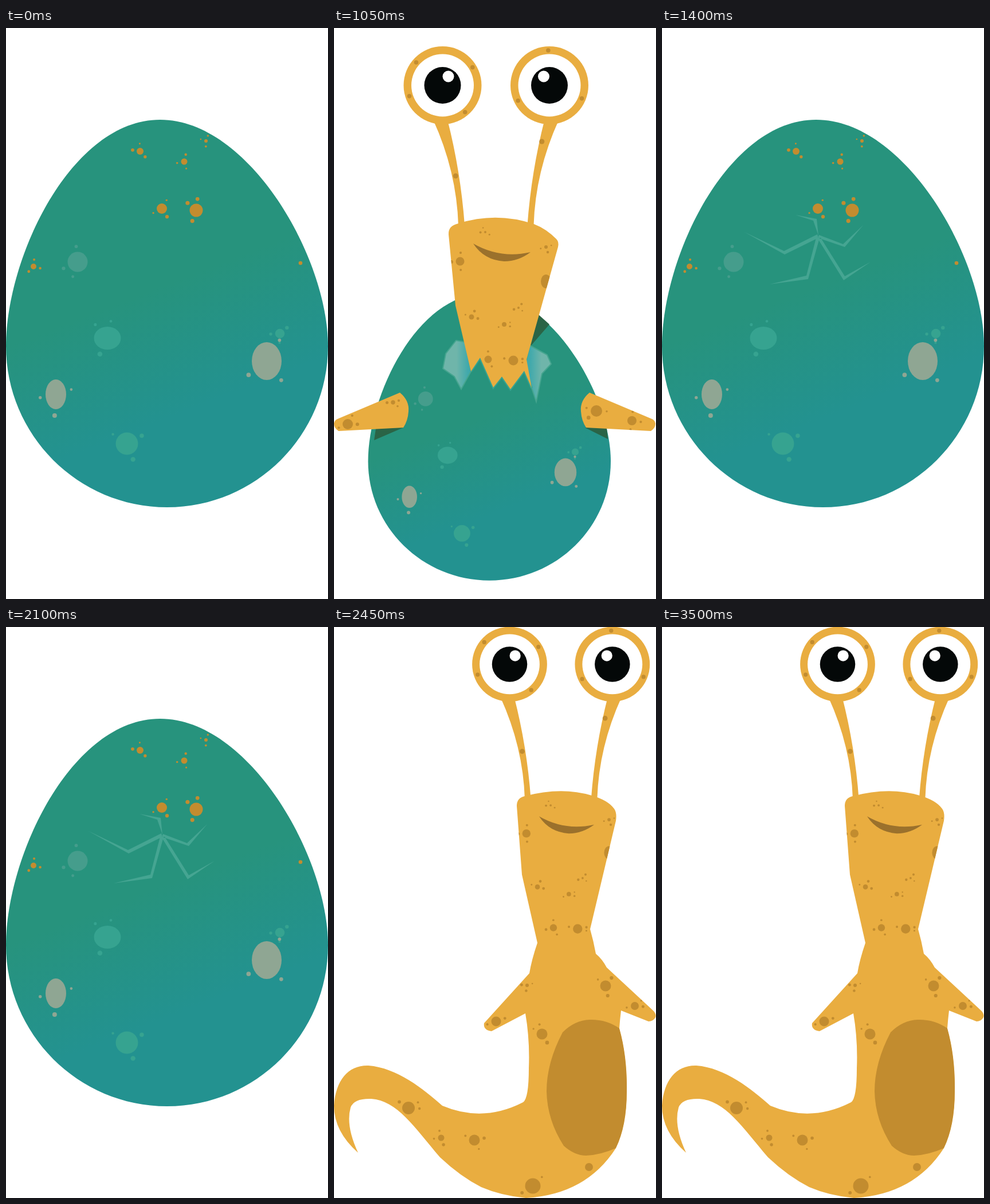
Recreate the animation shown at these times as an HTML page with a canvas. Size 562 by 996 pixels, loop 5.25 s.

```html
<!DOCTYPE html>
<html lang="en">
<head>
<meta charset="utf-8">
<title>Hatching snail</title>
<style>
  html, body { margin: 0; width: 100%; height: 100%; overflow: hidden; background: #fff; }
  canvas { display: block; }
</style>
</head>
<body>
<canvas id="stage" width="562" height="996"></canvas>
<script>
const ctx = document.getElementById('stage').getContext('2d');
const SKIN = '#e9ad40', SPOT = '#c28c2f', MINT = '#36a390', SHADE = '#2a6446';

// Repeatable random number from 0 to 1
const noise = seed => {
  const value = Math.sin(seed * 12.9898) * 43758.5453;
  return value - Math.floor(value);
};

const fill = (color, d) => {
  ctx.fillStyle = color;
  ctx.fill(new Path2D(d));
};

const oval = (color, x, y, rx, ry = rx) => {
  ctx.fillStyle = color;
  ctx.beginPath();
  ctx.ellipse(x, y, rx, ry, 0, 0, 7);
  ctx.fill();
};

// Each spot gets three small satellites around it
const spots = (color, ...list) => list.forEach(([x, y, rx, ry = rx]) => {
  oval(color, x, y, rx, ry);
  for (let i = 1; i < 4; i++) {
    const angle = 2.1 * i + 2 * noise(x + i), size = 0.6 + 0.8 * noise(y + i);
    oval(color, x + Math.cos(angle) * (1.2 * rx + 6), y + Math.sin(angle) * (1.2 * ry + 6), size * (1.5 + 0.1 * rx));
  }
});

const placed = (sx, sy, tx, ty, draw) => {
  ctx.save();
  ctx.transform(sx, 0, 0, sy, tx, ty);
  draw();
  ctx.restore();
};

// Fill a shape, then draw the details inside its outline only
const patch = (color, d, details) => {
  ctx.save();
  fill(color, d);
  ctx.clip(new Path2D(d));
  details();
  ctx.restore();
};

const blend = (x0, y0, x1, y1, from, to) => {
  const gradient = ctx.createLinearGradient(x0, y0, x1, y1);
  gradient.addColorStop(0, from);
  gradient.addColorStop(1, to);
  return gradient;
};

// A circle of radius 281 with its top point pulled up
function shell(details) {
  patch(blend(245, 460, 325, 665, '#27937d', '#239290'),
    'M269 160C424 160 562 400 562 555S436 836 281 836S0 710 0 555S114 160 269 160Z', details);
}

function shellSpots() {
  spots('#459d8c', [125, 408, 17.5]);
  spots(MINT, [177, 541, 23.5, 20], [211, 725, 19.5], [478, 533, 8.3]);
  spots('#8fa693', [455, 581, 26, 33], [87, 639, 18, 26]);
}

function egg(cracked) {
  shell(() => {
    shellSpots();
    spots(SPOT, [234, 215, 6], [311, 233, 5.5], [349, 197, 3], [272, 315, 9], [332, 318, 11.5], [48, 416, 5]);
    oval(SPOT, 514, 410, 3.3);
  });
  if (cracked) {
    fill('#45a592', 'M273 362L264 336L233 326L270 333ZM271 360L213 389L144 356L214 395L273 366Z' +
      'M269 366L252 432L188 447L255 438L275 366ZM271 366L317 440L364 408L319 433L277 366Z' +
      'M274 361L316 377L351 344L319 382L272 366Z');
  }
}

// Lid: 0 open, 1 half closed, 2 closed
function eyeStalk(lid, spotAngles, spotY) {
  const x = 189.5, y = 100;
  fill(SKIN, 'M173 160Q214 250 217 344H228Q221 250 198 160Z');
  oval(SPOT, 171 + spotY * 0.16, spotY, 4.5);
  oval(SKIN, x, y, 68);
  for (const degrees of spotAngles) {
    const angle = degrees * Math.PI / 180;
    oval(SPOT, x + 61 * Math.cos(angle), y + 61 * Math.sin(angle), 3.8);
  }
  ctx.save();
  oval('#fff', x, y, 54.5);
  ctx.clip();
  oval('#040808', x, y, 32);
  oval('#fff', x + 10, 84.5, 10);
  if (lid) fill(SKIN, lid === 2 ? 'M120 30H260V170H120Z' : 'M129.5 30H249.5V103Q189.5 66 129.5 103Z');
  ctx.restore();
}

function face(lid) {
  eyeStalk(lid, [50, 162, 221, 329], 258);
  placed(-1, 1, 565.5, 0, () => eyeStalk(lid, [26, 158, 272], 198));
  fill('#9b712c', 'M243 376Q290 403 343 391Q322 407 297 407Q262 405 243 376Z');
}

function headSpots() {
  spots(SPOT, [220, 407, 7.5], [264, 356, 2], [370, 382, 3], [240, 504, 4.5], [297, 517, 4],
    [322, 488, 2], [269, 578, 6.5], [313, 580, 8.5]);
  oval(SPOT, 370, 442, 9, 12);
}

function arm(...armSpots) {
  patch(SKIN, 'M115 636Q132 650 130 669Q129 685 121 697L8 703Q0 698 0 690Q1 684 6 682Z',
    () => spots(SPOT, ...armSpots));
}

function hatching() {
  placed(.7536, .74, 59.5, 345, () => shell(() => {}));
  placed(.74, .74, 67.3, 345, shellSpots);
  fill(SHADE, 'M357 500L376 517L343 555ZM73 699L70 719L121 697ZM438 697L478 717L476 698Z');

  ctx.strokeStyle = '#45a58f';
  ctx.lineWidth = 2;
  const shards = [
    ['M230 548L213 545L195 568L190 594L210 608L222 630L239 599Z', blend(214, 0, 234, 0, '#6fb5aa', '#40a9ac')],
    ['M342 554L372 570L379 586L363 603L353 652L345 628L334 588Z', blend(342, 0, 362, 0, '#40a9ac', '#6fb5aa')]
  ];
  for (const [d, color] of shards) {
    fill(color, d);
    ctx.stroke(new Path2D(d));
  }

  const teeth = '345 628L332 598L308 630L293 608L278 627L255 575L239 599';
  ctx.strokeStyle = MINT;
  ctx.lineWidth = 4;
  ctx.stroke(new Path2D('M' + teeth));
  patch(SKIN, 'M212 484L200 360Q199 345 217 341Q283 320 349 342Q370 350 388 368Q393 373 391 382' +
    'L358 500L336 578L' + teeth + 'Z', headSpots);
  arm([24, 691, 9], [103, 653, 3.7]);
  placed(-1, 1, 561, 0, () => arm([41, 685, 8], [103, 668, 10]));
  face(0);
}

function snail(lid) {
  const toHead = draw => placed(.9615, .9615, 124.3, -31.2, draw);
  const body = 'M328 432L319 312Q319 298 333 295Q397 278 450 294Q478 302 489 317Q494 324 492 338L447 527' +
    'Q453 548 457 570Q468 579 476 594L558 670Q563 676 561 681Q557 688 549 688L501 669Q499 685 498 700' +
    'Q512 750 511 810Q511 870 492 909Q440 990 335 996Q292 992 257 977Q220 958 185 925' +
    'C140 872 110 826 65 823Q35 822 29 838Q20 870 42 917Q0 880 0 835C3 790 25 764 60 765' +
    'C110 769 155 805 189 835Q260 865 330 829Q340 822 340 770Q342 720 334 674L275 705' +
    'Q260 703 262 691L341 604Q345 580 355 551Z';
  patch(SKIN, body, () => {
    spots(SPOT, [283, 688, 8.5], [337, 625, 3], [474, 626, 9.5], [525, 661, 7], [363, 710, 9.5],
      [130, 839, 11], [187, 891, 5.5], [245, 895, 9.5], [347, 975, 13.5]);
    oval(SPOT, 445, 942, 7);
    fill(SPOT, 'M498 700Q475 684 446 685Q420 686 399 707Q371 760 371 810Q372 860 401 905' +
      'Q420 922 440 922Q465 921 492 909Q511 870 511 810Q512 750 498 700Z');
    toHead(headSpots);
  });
  toHead(() => face(lid));
}

const whole = () => egg(false), cracked = () => egg(true), open = () => snail(0);
const poses = [whole, whole, cracked, hatching, cracked, hatching, cracked,
  open, () => snail(1), () => snail(2), open];
const STEP = 350, LOOP = 5250;

function frame() {
  const step = Math.floor(performance.now() % LOOP / STEP);
  ctx.fillStyle = '#fff';
  ctx.fillRect(0, 0, 562, 996);
  poses[Math.min(step, poses.length - 1)]();
  requestAnimationFrame(frame);
}
frame();
</script>
</body>
</html>
```
